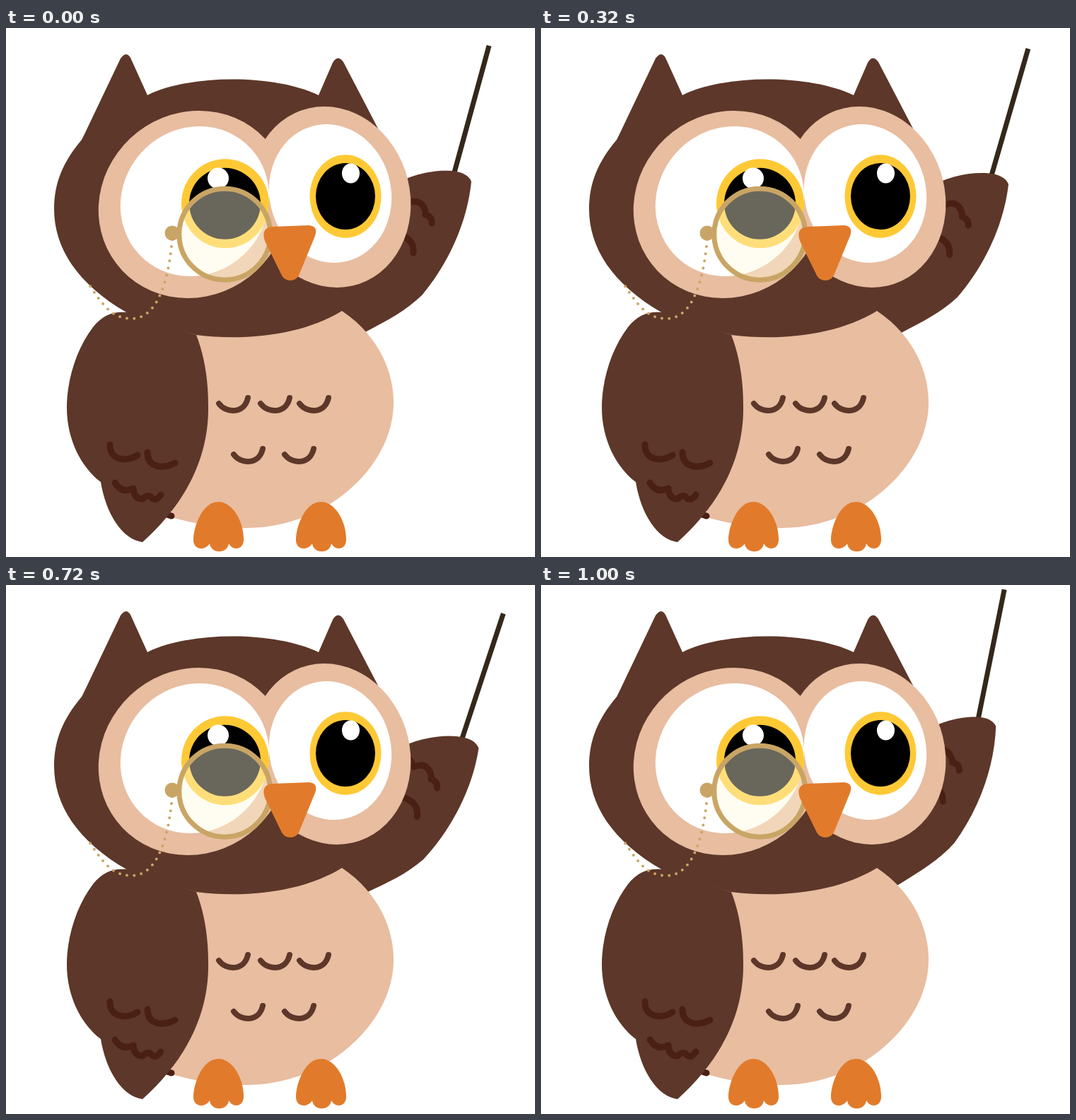
Animation, 748 px wide and 748 px high, one loop 3 s. Source, as an HTML page:

```html
<!DOCTYPE html>
<html lang="en">
<head>
<meta charset="utf-8">
<title>Teaching owl</title>
<style>
html, body { margin: 0; width: 100%; height: 100%; overflow: hidden; background: #fff; }
svg { display: block; width: 100vw; height: 100vh; }
.brown { fill: #5d3729; }
.skin { fill: #e8bda0; }
.white { fill: #fff; }
.iris { fill: #ffc935; }
.orange { fill: #e17b2b; }
.line { fill: none; stroke: #4a2014; stroke-width: 9; stroke-linecap: round; stroke-linejoin: round; }
.feather { stroke: #5d3729; stroke-width: 8; }
.chain { fill: none; stroke: #c9a565; stroke-width: 4; stroke-linecap: round; stroke-dasharray: 0 10.2; }
</style>
</head>
<body>
<svg viewBox="0 0 748 748">
  <defs>
    <path id="foot" class="orange" d="M300 670C278 670 265 705 265 724C265 738 281 740 288 729C290 744 313 744 315 729C321 740 337 738 336 722C336 700 322 670 300 670Z"/>
    <path id="feather" class="line feather" d="M301 531C311 545 337 546 342 523"/>
  </defs>

  <g id="arm">
    <path d="M631 215L683 25" stroke="#33281a" stroke-width="7"/>
    <path class="brown" d="M470 330L540 226C570 207 605 200 630 202C645 203 655 209 658 217C653 268 630 328 588 378C565 400 540 413 508 430L470 448Z"/>
    <path class="line" d="M552 231Q562 236 568 248Q582 241 590 252Q594 260 593 264Q603 267 602 276M545 290Q578 294 576 318"/>
  </g>

  <path class="skin" d="M475 400C520 430 548 478 548 530C548 618 455 707 340 707C300 707 268 701 234 692L240 420Z"/>
  <use href="#feather"/>
  <use href="#feather" x="59"/>
  <use href="#feather" x="114"/>
  <use href="#feather" x="21" y="72"/>
  <use href="#feather" x="93" y="72"/>

  <path class="brown" d="M200 95C260 65 380 65 442 95L462 49Q469 37 477 48L526 142L540 340L475 400C420 434 340 443 269 434L172 403C100 362 68 310 68 256C68 220 80 190 107 158L111 150L162 43Q170 32 176 42Z"/>

  <path class="line" d="M228 688L234 690"/>
  <path class="brown" d="M178 403C155 399 138 404 123 423C100 453 86 497 86 537C86 580 105 620 134 642C141 686 164 723 193 727C251 675 287 611 286 535C286 495 280 462 269 434Z"/>
  <path class="line" d="M147 589C146 612 172 614 186 604M200 600C200 622 222 624 239 615M154 643Q164 659 180 651Q181 666 193 666Q199 660 204 662Q210 672 219 660"/>

  <ellipse class="skin" rx="134" ry="132.5" transform="translate(265 249.5) skewX(-3.5)"/>
  <ellipse class="skin" rx="113" ry="128" transform="translate(459 239) skewX(4)"/>
  <ellipse class="white" rx="105" ry="106" transform="translate(267 245) skewX(-3.5)"/>
  <ellipse class="white" rx="86.5" ry="98" transform="translate(458.5 234) skewX(3.1)"/>

  <ellipse class="iris" cx="310" cy="248.3" rx="62" ry="63"/>
  <circle cx="309.5" cy="248.3" r="50.5"/>
  <circle class="white" cx="300" cy="212.5" r="15"/>
  <ellipse class="iris" cx="480" cy="238" rx="50.5" ry="58.7"/>
  <ellipse cx="480" cy="238" rx="42" ry="47"/>
  <ellipse class="white" cx="487.5" cy="205.5" rx="12.5" ry="14"/>

  <path class="chain" d="M235 299C231 345 218 411 178 411C150 411 138 393 119 365"/>
  <circle cx="235" cy="290" r="10.5" fill="#c9a565"/>
  <circle cx="309.3" cy="291.7" r="64.5" fill="#fffadc" fill-opacity=".41" stroke="#c9a565" stroke-width="7"/>
  <path class="orange" d="M376 281L428 279Q442 280 437 294L414 350Q410 357 402 357Q394 357 390 350L366 301Q360 283 376 281Z"/>

  <use href="#foot"/>
  <use href="#foot" x="145"/>
</svg>
<script>
const LOOP = 3000, STEP = 40, SWING_END = 1000;
const PIVOT = "394 426";
// One wave of the arm: [ms, degrees]
const KEYS = [[0, 0], [45, 0], [120, 2.7], [195, 5.6], [240, 4.9], [320, 0.84],
  [400, -3.7], [430, -3.9], [480, -3.08], [560, -0.6], [600, 0]];
const arm = document.getElementById("arm");

// Tangent at key i, flat at turning points
function slope(i) {
  const a = KEYS[i - 1], b = KEYS[i], c = KEYS[i + 1];
  if (!a || !c || (b[1] - a[1]) * (c[1] - b[1]) <= 0) return 0;
  return (c[1] - a[1]) / (c[0] - a[0]);
}

function angleAt(ms) {
  let i = 0;
  while (i < KEYS.length - 2 && ms >= KEYS[i + 1][0]) i++;
  const [t0, y0] = KEYS[i], [t1, y1] = KEYS[i + 1];
  const d = t1 - t0, u = (ms - t0) / d, v = 1 - u;
  return v * v * ((1 + 2 * u) * y0 + u * d * slope(i)) +
    u * u * ((1 + 2 * v) * y1 - v * d * slope(i + 1));
}

function draw(ms) {
  const t = Math.min(Math.floor(ms / STEP) * STEP, SWING_END);
  const angle = angleAt(t < 600 ? t : t - 594);
  arm.setAttribute("transform", `rotate(${angle.toFixed(3)} ${PIVOT})`);
}

const start = performance.now();
function tick() {
  draw((performance.now() - start) % LOOP);
  requestAnimationFrame(tick);
}
tick();
</script>
</body>
</html>
```
